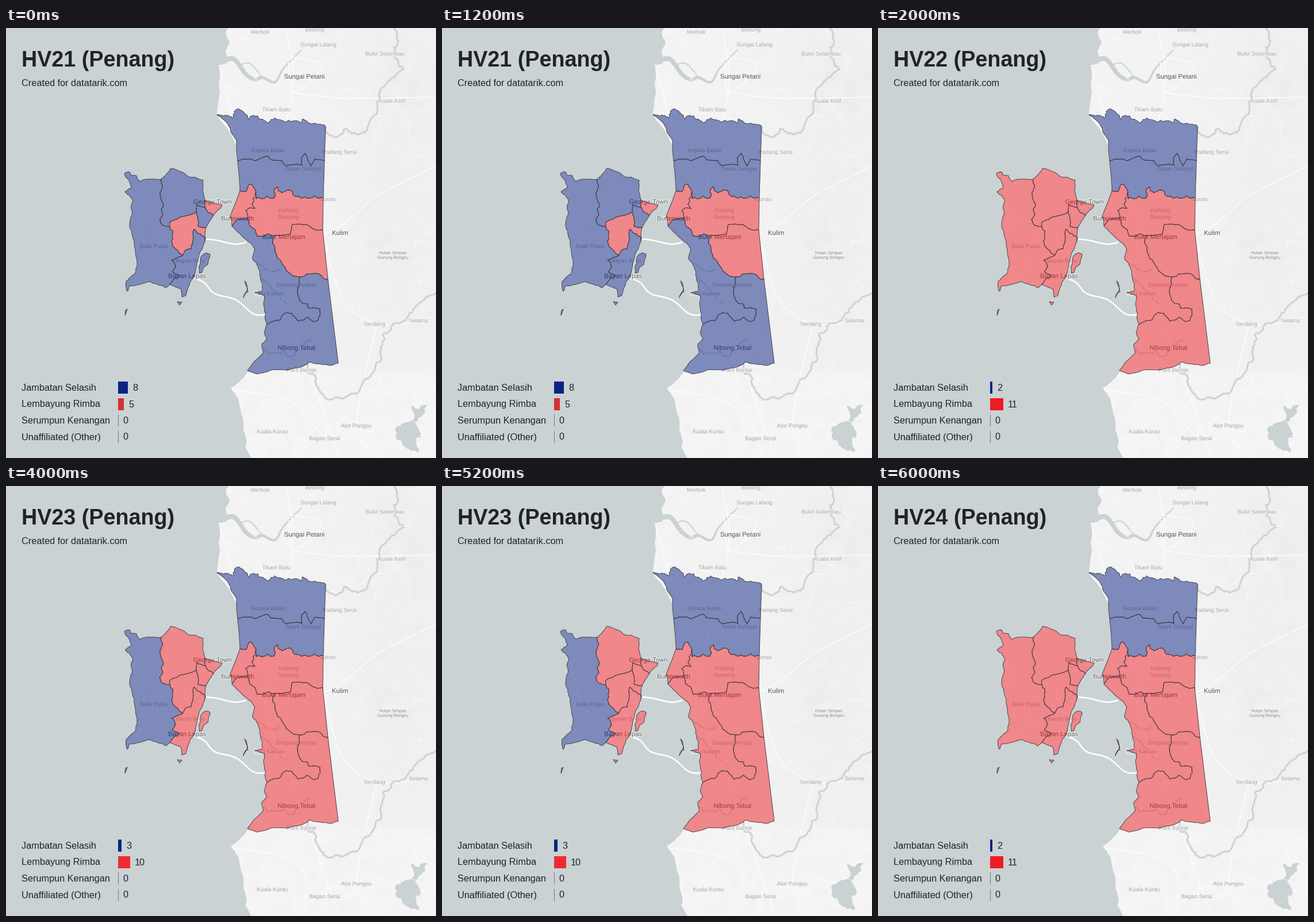
Animation of 748x748 px, one loop 8 s. Source, as a matplotlib script:

```python
import numpy as np
import matplotlib.pyplot as plt
import matplotlib.patheffects as pe
from matplotlib.animation import FuncAnimation
from matplotlib.colors import to_rgba
from matplotlib.patches import PathPatch, Polygon, Rectangle
from matplotlib.path import Path

SIZE, DPI = 748, 100
SEA, LINE, INK = "#cad2d3", "#3b3d42", "#212325"
BLUE, RED = "#0a2384", "#ed1c24"
FONT = "Liberation Sans"
rng = np.random.default_rng(7)


def rough(*points, amp=0.09):
    """Natural border: seeded midpoint displacement between a few points."""
    pts = np.array(points, float)
    while np.hypot(*np.diff(pts, axis=0).T).max() > 6:
        step = np.diff(pts, axis=0)
        normal = np.column_stack([-step[:, 1], step[:, 0]])
        bend = np.clip(rng.normal(0, amp, (len(step), 1)), -0.22, 0.22)
        out = np.empty((2 * len(pts) - 1, 2))
        out[::2] = pts
        out[1::2] = pts[:-1] + step / 2 + normal * bend
        pts = out
    return pts


def smooth(*points, n=16):
    """Catmull-Rom curve through the points."""
    p = np.array([points[0], *points, points[-1]], float)
    t = np.linspace(0, 1, n)[:, None]
    return np.vstack([
        0.5 * (2 * b + (c - a) * t + (2 * a - 5 * b + 4 * c - d) * t**2
               + (3 * b - a - 3 * c + d) * t**3)
        for a, b, c, d in zip(p, p[1:], p[2:], p[3:])])


def join(*paths):
    return np.vstack(paths)


# Mainland borders
muda = rough((367, 151), (384, 152), (396, 156), (400, 142), (417, 150), (422, 159),
             (431, 152), (454, 165), (461, 159), (486, 164), (513, 165), (516, 158),
             (534, 166), (552, 168), (556, 172), amp=0.17)
kepala_tasek = rough((403, 231), (420, 228), (433, 231), (455, 223), (460, 229), (480, 231),
                     (486, 239), (515, 239), (514, 226), (520, 218), (531, 240), (537, 228),
                     (554, 231), amp=0.05)
tasek_bagan = rough((407, 283), (418, 284), (423, 272), (428, 272), (435, 285))
tasek_pauh = rough((435, 285), (435, 297), (453, 293), (466, 296), (467, 282), (472, 276),
                   (480, 287), (497, 284), (503, 293), (525, 296), (537, 292), (552, 295),
                   amp=0.15)
bagan_pauh = rough((435, 285), (430, 297), (433, 314), (417, 318), (421, 331), amp=0.15)
bagan_kawan = rough((421, 331), (407, 332), (393, 344))
pauh_kawan = rough((421, 331), (424, 344), (437, 362), (456, 358), (468, 361))
pauh_mertajam = rough((468, 361), (495, 358), (498, 342), (523, 342), (533, 349), (551, 351),
                      amp=0.07)
kawan_mertajam = rough((468, 361), (464, 370), (468, 389), (480, 409), (511, 433))
mertajam_tebal = rough((560, 437), (545, 428), (522, 428), (511, 433))
kawan_tebal = rough((511, 433), (507, 455), (511, 474), (524, 480), (526, 487), (546, 489),
                    (543, 508), (535, 511), (524, 503), (508, 510), (497, 496), (488, 495),
                    (474, 509), (454, 516))
south = rough((578, 583), (566, 587), (527, 581), (524, 585), (490, 595), (437, 602),
              (420, 596), amp=0.03)
coast_kepala = rough((367, 151), (386, 167), (401, 196), (403, 231), amp=0.04)
coast_tasek = rough((403, 231), (407, 283), amp=0.01)
coast_bagan = rough((407, 283), (390, 327), (393, 344), amp=0.03)
coast_kawan = rough((393, 344), (403, 355), (433, 385), (429, 402), (438, 415), (446, 445),
                    (445, 458), (433, 460), (450, 466), (448, 478), (454, 516), amp=0.06)
coast_tebal = rough((454, 516), (449, 530), (454, 541), (445, 550), (447, 566), (420, 596),
                    amp=0.05)

# Island borders
north_balik = rough((206, 253), (215, 250), (218, 256), (227, 257), (233, 267), (270, 263))
balik_bendera = rough((270, 263), (268, 289), (273, 324), (267, 333), (285, 346))
balik_gelugor = rough((285, 346), (290, 380), (307, 396))
balik_bayan = rough((307, 396), (288, 404), (295, 416), (290, 425), (302, 430), (291, 438),
                    (285, 446))
coast_balik = rough((285, 446), (278, 452), (250, 441), (215, 449), (211, 458), (209, 441),
                    (218, 432), (228, 414), (223, 370), (215, 345), (221, 302), (215, 291),
                    (207, 285), (218, 277), (206, 253), amp=0.07)
north_bendera = rough((270, 263), (287, 244), (305, 250), (314, 256), (343, 265), (346, 299),
                      amp=0.05)
bendera_tanjong = rough((346, 299), (347, 313))
bendera_jelutong = rough((347, 313), (332, 307), (331, 320))
bendera_gelugor = rough((331, 320), (303, 329), (285, 338), (285, 346), amp=0.05)
coast_tanjong = rough((346, 299), (376, 308), (361, 326), amp=0.05)
tanjong_jelutong = rough((361, 326), (347, 313))
jelutong_gelugor = rough((331, 320), (334, 345), (348, 347), amp=0.06)
coast_jelutong = rough((348, 347), (361, 326), amp=0.04)
coast_gelugor = rough((348, 347), (346, 370), amp=0.04)
gelugor_bayan = rough((346, 370), (338, 358), (327, 350), (326, 362), (322, 384), (307, 396),
                      amp=0.13)
coast_bayan = rough((346, 370), (330, 420), (320, 442), (313, 465), (306, 468), (304, 454),
                    (285, 446), amp=0.04)
jerejak = rough((349, 391), (355, 394), (341, 425), (336, 426), (338, 405), (349, 391))
aman = rough((415, 440), (421, 459), (413, 469), (415, 440))
rimau = rough((298, 476), (306, 477), (302, 482), (298, 476))
kendi = rough((211, 489), (207, 500), (208, 491), (211, 489))

DISTRICTS = {
    "kepala": [join(muda, kepala_tasek[::-1], coast_kepala[::-1])],
    "tasek": [join(kepala_tasek, tasek_pauh[::-1], tasek_bagan[::-1], coast_tasek[::-1])],
    "bagan": [join(tasek_bagan, bagan_pauh, bagan_kawan, coast_bagan[::-1])],
    "pauh": [join(tasek_pauh, pauh_mertajam[::-1], pauh_kawan[::-1], bagan_pauh[::-1])],
    "mertajam": [join(pauh_mertajam, mertajam_tebal, kawan_mertajam[::-1])],
    "kawan": [join(bagan_kawan[::-1], pauh_kawan, kawan_mertajam, kawan_tebal,
                   coast_kawan[::-1]), aman],
    "tebal": [join(mertajam_tebal[::-1], south, coast_tebal[::-1], kawan_tebal[::-1])],
    "balik": [join(north_balik, balik_bendera, balik_gelugor, balik_bayan, coast_balik), kendi],
    "bendera": [join(balik_bendera[::-1], north_bendera, bendera_tanjong,
                     bendera_jelutong, bendera_gelugor)],
    "tanjong": [join(coast_tanjong, tanjong_jelutong, bendera_tanjong[::-1])],
    "jelutong": [join(bendera_jelutong, jelutong_gelugor, coast_jelutong, tanjong_jelutong)],
    "gelugor": [join(bendera_gelugor[::-1], jelutong_gelugor, coast_gelugor,
                     gelugor_bayan, balik_gelugor[::-1])],
    "bayan": [join(gelugor_bayan[::-1], coast_bayan, balik_bayan[::-1]), jerejak, rimau],
}

NORTH = {"kepala", "tasek"}
ROUNDS = [
    ("HV21", NORTH | {"kawan", "tebal", "balik", "bendera", "jelutong", "bayan"}),
    ("HV22", NORTH),
    ("HV23", NORTH | {"balik"}),
    ("HV24", NORTH),
]
PARTIES = ["Jambatan Selasih", "Lembayung Rimba", "Serumpun Kenangan", "Unaffiliated (Other)"]
RED_BARS = {5: "#d03338", 10: "#ee2b33", 11: RED}

fig = plt.figure(figsize=(SIZE / DPI, SIZE / DPI), dpi=DPI, facecolor=SEA)
ax = fig.add_axes([0, 0, 1, 1])


def write(x, y, text, px, color=INK, **kw):
    return ax.text(x, y, text, fontsize=px * 72 / DPI, color=color, family=FONT, **kw)


def stroke(points, color, width, z=2):
    ax.plot(*np.transpose(points), color=color, lw=width * 72 / DPI, zorder=z,
            solid_capstyle="round", solid_joinstyle="round")


def draw_land():
    coast_north = rough((388, -5), (382, 8), (389, 26), (382, 38), (384, 62), (369, 64),
                        (372, 110), (367, 151), amp=0.05)
    shore = smooth((372, 160), (387, 178), (403, 210))
    coast_south = rough((420, 596), (412, 610), (391, 627), (408, 665), (413, 700), (430, 755),
                        amp=0.06)
    mainland = join(coast_north, shore, coast_tasek, coast_bagan, coast_kawan, coast_tebal,
                    coast_south, [(760, 755), (760, -5)])
    n = 94
    x, y = np.meshgrid(np.linspace(0, SIZE, n), np.linspace(0, SIZE, n))
    hills = sum(np.exp(-((x - cx) / 55) ** 2 - ((y - cy) / ry) ** 2)
                for cx, cy, ry in [(665, 360, 110), (260, 320, 75), (700, 90, 100)])
    noise = rng.normal(size=(n, n))
    noise = (noise + np.roll(noise, 1, 0) + np.roll(noise, (1, -1), (0, 1))) / 3
    shade = 0.957 - 0.018 * np.clip((x - 380) / 300, 0, 1) * (y < 600)
    shade += (0.003 + 0.011 * hills) * noise - 0.008 * hills
    for poly in [mainland, *(p for parts in DISTRICTS.values() for p in parts)]:
        outline = ax.add_patch(PathPatch(Path(poly), fc="none", ec="none"))
        image = ax.imshow(shade, cmap="gray", vmin=0, vmax=1, extent=(0, SIZE, SIZE, 0),
                          interpolation="bicubic", aspect="auto", zorder=1)
        image.set_clip_path(outline)


def draw_water():
    river = smooth((382, 55), (398, 55), (417, 80), (433, 90), (446, 86), (468, 94),
                   (483, 70), (514, 38))
    for k in range(0, len(river) - 1, 4):
        stroke(river[k:k + 5], SEA, 9 - 7.5 * k / len(river))
    stroke(smooth((408, 64), (425, 62), (446, 86)), SEA, 2)
    lake = rough((705, 657), (733, 656), (717, 680), (712, 690), (722, 712), (712, 715),
                 (717, 738), (690, 726), (678, 695), (706, 683), (705, 657), amp=0.16)
    ax.add_patch(Polygon(lake, fc=SEA, ec="none", zorder=2))
    stroke(rough((438, 410), (460, 424), (475, 420), amp=0.2), SEA, 1.8)
    stroke(rough((440, 438), (460, 449), (487, 478), amp=0.2), SEA, 1.8)
    stroke(rough((445, 558), (495, 572), (530, 545), amp=0.2), SEA, 1.8)


def draw_lines():
    roads = [
        [(487, 0), (499, 105), (463, 260), (452, 390), (500, 520), (580, 748)],
        [(372, 70), (395, 150), (440, 270), (430, 350)],
        [(495, 112), (590, 122), (748, 120)],
        [(430, 350), (552, 359), (650, 290), (748, 240)],
        [(552, 359), (585, 470), (645, 515), (720, 510)],
        [(495, 50), (549, 65), (500, 112), (492, 60)],
        [(395, 630), (495, 650), (560, 713), (640, 700)],
        [(645, 515), (610, 690), (650, 748)],
        [(223, 300), (248, 385), (318, 430), (340, 375)]]
    for road in roads:
        stroke(smooth(*road), "#fcfcfb", 1.6)
    for _ in range(45):
        start = rng.uniform((460, 0), (748, 748))
        walk = np.vstack([start, start + np.cumsum(rng.normal(0, 13, (5, 2)), axis=0)])
        stroke(smooth(*walk), "#f9f9f8", 0.9)
    stroke(smooth((346, 367), (365, 369), (398, 376), (417, 373)), "white", 2.6)
    stroke(smooth((325, 434), (345, 443), (363, 462), (400, 473), (430, 497), (453, 499)),
           "white", 2.6)
    east = rough((556, 172), (575, 190), (590, 175), (617, 183), (645, 150), (650, 110),
                 (692, 72), (676, 45), (682, 25), (675, 0), amp=0.18)
    southeast = rough((524, 585), (540, 610), (570, 645), (597, 638), (640, 596), (655, 552),
                      (670, 518), (696, 508), (718, 479), (748, 461), amp=0.15)
    for border in (east, southeast):
        stroke(border, "#e2e3e3", 4)
        stroke(border, "#c6c9c9", 1.4)


def draw_labels():
    halo = [pe.withStroke(linewidth=1.6, foreground="#f3f3f2")]
    towns = [
        (442, 6, "Merbok"), (537, 2, "Bedong"), (543, 28, "Sungai Lalang"),
        (659, 44, "Bukit Selambau"), (470, 141, "Tikam Batu"), (671, 126, "Kuala Ketil"),
        (456, 212, "Kepala Batas"), (580, 215, "Padang Serai"), (517, 244, "Tasek Gelugor"),
        (560, 297, "Lunas"), (491, 316, "Kubang"), (491, 328, "Semang"),
        (257, 379, "Balik Pulau"), (320, 404, "Bayan Baru"), (504, 446, "Simpang Ampat"),
        (457, 461, "Batu Kawan"), (641, 514, "Serdang"), (717, 508, "Selama"),
        (514, 594, "Parit Bantar"), (609, 691, "Alor Pongsu"), (463, 701, "Kuala Kurau"),
        (554, 713, "Bagan Serai")]
    cities = [
        (519, 84, "Sungai Petani"), (359, 302, "George Town"), (403, 331, "Butterworth"),
        (581, 356, "Kulim"), (483, 363, "Bukit Mertajam"), (315, 431, "Bayan Lepas"),
        (505, 556, "Nibong Tebal")]
    forest = [(673, 391, "Hutan Simpan"), (673, 399, "Gunung Bongsu")]
    for group, px, color in [(towns, 9.8, "#a9abac"), (cities, 11.3, "#55585a"),
                             (forest, 7.5, "#808283")]:
        for x, y, name in group:
            write(x, y, name, px, color, ha="center", va="center_baseline",
                  path_effects=halo, zorder=3, clip_on=True)


draw_land()
draw_water()
draw_lines()
draw_labels()
shapes = {
    name: [ax.add_patch(Polygon(p, ec=LINE, lw=0.65, joinstyle="round", zorder=4))
           for p in parts]
    for name, parts in DISTRICTS.items()}

title = write(27, 67, "", 37.8, weight="bold")
write(27, 101, "Created for datatarik.com", 16.3)
bars, counts = [], []
for row, party in enumerate(PARTIES):
    top = 615 + 28.5 * row
    write(27, top + 16, party, 16.3)
    bars.append(ax.add_patch(Rectangle((195, top), 0, 21, lw=0)))
    counts.append(write(203, top + 16, "", 16.3))
    if row > 1:
        ax.add_patch(Rectangle((195, top), 1, 21, fc="#77797b", lw=0))

ax.set(xlim=(0, SIZE), ylim=(SIZE, 0))
ax.axis("off")


def update(i):
    name, blue = ROUNDS[i]
    title.set_text(f"{name} (Penang)")
    for district, patches in shapes.items():
        for patch in patches:
            patch.set_facecolor(to_rgba(BLUE if district in blue else RED, 0.5))
    seats = [len(blue), len(DISTRICTS) - len(blue), 0, 0]
    colors = [BLUE, RED_BARS[seats[1]], "none", "none"]
    for bar, count, n, color in zip(bars, counts, seats, colors):
        bar.set(width=2.1 * n, facecolor=color)
        count.set_text(str(n))
        count.set_x(203 + 2.1 * n)


anim = FuncAnimation(fig, update, frames=len(ROUNDS), interval=2000, repeat=True,
                     init_func=lambda: update(0))
plt.show()
```
